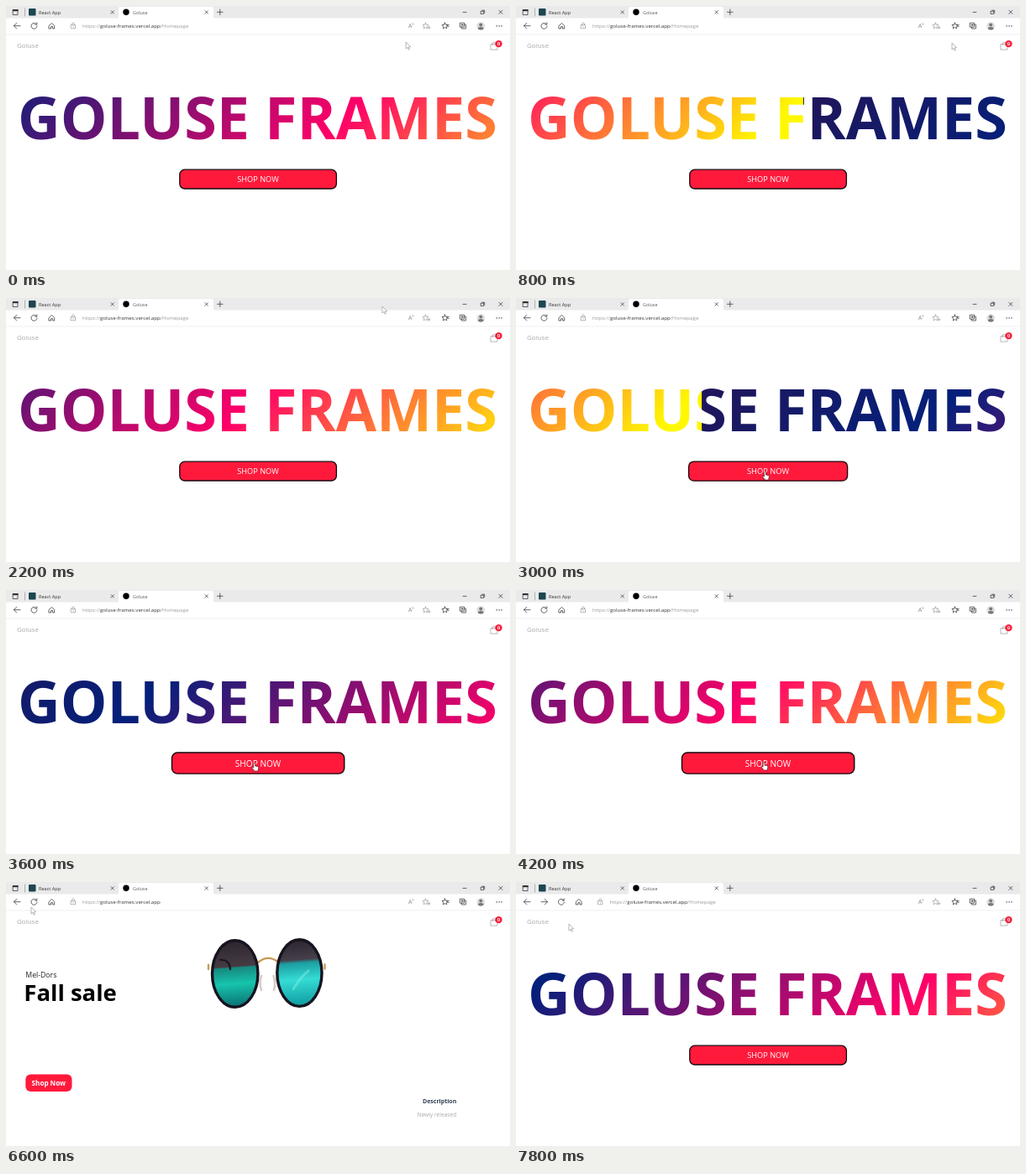
An HTML page that plays this animation: 600x315 px, repeating every 8000 ms.

```html
<!DOCTYPE html>
<html lang="en">
<head>
<meta charset="utf-8">
<title>Goluse</title>
<style>
  html, body { margin: 0; width: 100%; height: 100%; overflow: hidden; background: #fff; }
  #stage { position: absolute; left: 0; top: 0; width: 600px; height: 315px; overflow: hidden; }
  svg { position: absolute; left: 0; top: 0; font-family: "Open Sans", "Noto Sans", sans-serif; }
  #title {
    position: absolute; left: 14px; top: 85px; width: 571.6px; height: 95px;
    font: bold 70px/95px "Open Sans", "Noto Sans", sans-serif; white-space: nowrap;
    color: transparent;
    background-image: linear-gradient(135deg, #231557 0%, #04207a 27%, #ff0068 64%, #fff800 94%);
    background-size: 1143px 100%;
    -webkit-background-clip: text; background-clip: text;
  }
  .line { fill: none; stroke: #333; stroke-width: .75; stroke-linecap: round; stroke-linejoin: round; }
  .soft { stroke: #888; stroke-width: .6; }
  .bold { font-weight: bold; }
</style>
</head>
<body>
<div id="stage">
  <svg width="600" height="315" viewBox="0 0 600 315">
    <defs>
      <linearGradient id="leftLens" x1=".45" y1="0" x2=".5" y2="1">
        <stop offset="0" stop-color="#2c2530"/><stop offset=".39" stop-color="#463b43"/>
        <stop offset=".41" stop-color="#17887f"/><stop offset=".65" stop-color="#16c4ac"/>
        <stop offset="1" stop-color="#0b6f72"/>
      </linearGradient>
      <linearGradient id="rightLens" x1=".45" y1="0" x2=".5" y2="1">
        <stop offset="0" stop-color="#2c2530"/><stop offset=".3" stop-color="#45404a"/>
        <stop offset=".35" stop-color="#1c9da0"/><stop offset=".6" stop-color="#35dcd4"/>
        <stop offset="1" stop-color="#0f9aa0"/>
      </linearGradient>
    </defs>

    <!-- tab strip -->
    <path fill="#eaeaea" d="M0 0H600V14.5H0Z"/>
    <path fill="#fff" d="M133 15Q134 15 134 12V3Q134 1 136 1H245Q247 1 247 3V12Q247 15 249 15Z"/>
    <path class="line" d="M8.5 4.5h5.5v6h-5.5z"/>
    <path fill="#333" d="M8 4h6.5v2.2H8z"/>
    <path class="line soft" d="M22.5 3V12"/>
    <rect x="27" y="3" width="8.5" height="8.5" rx="1" fill="#1d4650"/>
    <circle cx="143" cy="7.2" r="3.7"/>
    <text x="39" y="9.5" font-size="5.6" fill="#333">React App</text>
    <text x="151" y="9.5" font-size="5.4" fill="#555">Goluse</text>
    <path class="line" d="M125 5.7l3.4 3.4m0-3.4l-3.4 3.4M237 5.7l3.4 3.4m0-3.4l-3.4 3.4M251.5 7.3h6.5m-3.2-3.2v6.4"/>
    <path class="line" d="M544 7.4h4M586.8 5.2l4.2 4.2m0-4.2l-4.2 4.2M565.5 6.2h3.2v3.2h-3.2zM566.7 5.2h3v3"/>

    <!-- toolbar -->
    <path class="line" d="M17 23.7H9.5m3.2-3.3l-3.3 3.3l3.3 3.3"/>
    <path id="forward" class="line" d="M30 23.7h7.5m-3.2-3.3l3.3 3.3l-3.3 3.3"/>
    <g id="address">
      <path class="line" d="M36.4 21.8A3.5 3.5 0 1 0 37 24M36.8 19.9v2.2h-2.3"/>
      <path class="line" d="M51.3 23.4l3.2-2.9l3.2 2.9v3.6h-2.2v-2.4h-2v2.4h-2.2z"/>
      <path class="line soft" d="M77.5 22.6h5v4.2h-5zM78.6 22.6v-1.2a1.4 1.4 0 0 1 2.8 0v1.2M80 24.3v.8"/>
      <text x="91" y="26.2" font-size="6.15" fill="#999">https://<tspan fill="#333">goluse-frames.vercel.app</tspan><tspan id="path">/Homepage</tspan></text>
    </g>
    <text x="479" y="26.3" font-size="6.8" fill="#888">A</text>
    <path class="line soft" d="M484.3 20.2q1.2 1.2 0 2.6"/>
    <g id="stars"></g>
    <path class="line soft" d="M502.3 25.8h2.8m-1.4-1.4v2.8"/>
    <path class="line" d="M524.8 22.6h2.4m-1.7 1.8h1.7"/>
    <path class="line" d="M540.7 20.2h4.9v4.9h-4.9zM542.4 25.1v1.9h5v-5h-1.8M543.1 21.5v2.3m-1.1-1.2h2.3"/>
    <circle cx="565.2" cy="24" r="4.8" fill="#dcdcdc"/>
    <circle cx="565.2" cy="22.5" r="1.9" fill="#777"/>
    <path fill="#777" d="M561.8 27.3q0-2.4 3.4-2.4t3.4 2.4q-3.4 2.6-6.8 0"/>
    <path fill="#444" d="M583.5 23.3h1.3v1.3h-1.3zm2.9 0h1.3v1.3h-1.3zm2.9 0h1.3v1.3h-1.3z"/>
    <path stroke="#f0f0f0" d="M0 33.9H600"/>

    <!-- site header -->
    <text x="13" y="50" font-size="8" fill="#aaa">Goluse</text>
    <path class="line soft" d="M577.3 45.6h7.6v6.5h-7.6zM579.2 46.8v-1.6a1.8 1.8 0 0 1 3.6 0v1.6"/>
    <circle cx="586.5" cy="45.1" r="4.2" fill="#f8203c"/>
    <text class="bold" x="586.5" y="47.1" font-size="5.4" fill="#fff" text-anchor="middle">0</text>

    <g id="shop">
      <rect x="206.8" y="195.2" width="186.6" height="22.8" rx="6" fill="#ff1a3c" stroke="#15080c" stroke-width="1.3"/>
      <text x="300" y="210.2" font-size="9.2" font-weight="500" fill="#fff" text-anchor="middle">SHOP NOW</text>
    </g>

    <g id="product">
      <text x="23.3" y="114" font-size="8.7" fill="#222">Mel-Dors</text>
      <text class="bold" x="21.3" y="142.2" font-size="27.5">Fall sale</text>
      <rect x="23.3" y="229.5" width="55.2" height="20.5" rx="6" fill="#ff1a3c"/>
      <text class="bold" x="50.8" y="243" font-size="8.1" fill="#fff" text-anchor="middle">Shop Now</text>
      <text class="bold" x="536.3" y="264.4" font-size="7" fill="#2f3e50" text-anchor="end">Description</text>
      <text x="536.3" y="279.6" font-size="6.65" fill="#aaa" text-anchor="end">Newly released</text>
      <g fill="none" stroke-linecap="round">
        <path stroke="#c99a55" stroke-width="2.4" d="M300 96Q312 86 324 95.5M241 99v5M379.5 98.5v5"/>
        <path stroke="#d8cbc6" stroke-width="2.6" d="M304 112q-3 8 0 17M318.5 112q3 8 .5 17"/>
        <g stroke="#17141f" stroke-width="3.4">
          <ellipse cx="272.7" cy="109.5" rx="27.2" ry="39.8" fill="url(#leftLens)"/>
          <ellipse cx="349.4" cy="108.6" rx="26.6" ry="39.8" fill="url(#rightLens)"/>
        </g>
        <path stroke="#1d1820" stroke-width="2.4" d="M255 93q11-1 12 11"/>
        <path stroke="#7eeee5" stroke-width="3" opacity=".5" d="M342 128q8-14 18-22"/>
      </g>
    </g>
  </svg>

  <div id="title">GOLUSE FRAMES</div>

  <svg width="600" height="315" viewBox="0 0 600 315">
    <g id="cursor" stroke-linejoin="round">
      <path id="arrow" fill="#fff" stroke="#999" stroke-width=".7" d="M0 0V8L1.9 6.3L3.2 9.2L4.4 8.6L3.1 5.8H5.7Z"/>
      <path id="hand" fill="#fff" stroke="#222" stroke-width=".6" d="M-.9 .7Q0-.5 .9 .7V4L4 4.7Q5 5 4.8 6.5L4 10H.2L-2.7 6.4Q-2.6 5-.9 6Z"/>
    </g>
  </svg>
</div>
<script>
const LOOP = 8000, STEP = 200;
const OPEN = 5200, BACK = 7400;      // product page shown, home page shown again
const SPEED = 0.5745, TILE = 1143;   // gradient px per ms, px per repeat

const cursorPath = [
  [0, 476, 43], [800, 519, 44], [1400, 512, 40], [2200, 448, 10], [3000, 296.5, 207],
  [4200, 295, 205], [5800, 295, 205], [6600, 30, 30], [7000, 13, 22], [7200, 13, 22], [7800, 63, 50]
];
const hoverScale = [[2800, 1], [3000, 1.013], [3200, 1.07], [3400, 1.1], [5200, 1.1]];

const el = id => document.getElementById(id);
const show = (id, on) => { el(id).style.display = on ? "" : "none"; };
const ease = k => k * k * (3 - 2 * k);

function sample(track, t, curve = k => k) {
  const next = track.findIndex(p => p[0] > t);
  if (next === 0) return track[0].slice(1);
  if (next < 0) return track[track.length - 1].slice(1);
  const a = track[next - 1], b = track[next];
  const k = curve((t - a[0]) / (b[0] - a[0]));
  return a.slice(1).map((v, i) => v + (b[i + 1] - v) * k);
}

function star(cx, cy, style) {
  const points = Array.from({ length: 10 }, (_, i) => {
    const r = i % 2 ? 1.8 : 3.8, a = i * Math.PI / 5 - Math.PI / 2;
    return (cx + r * Math.cos(a)).toFixed(2) + "," + (cy + r * Math.sin(a)).toFixed(2);
  });
  return `<polygon class="${style}" points="${points.join(" ")}"/>`;
}
el("stars").innerHTML = star(499.5, 23.8, "line soft") + star(522.5, 23.8, "line");

function draw(t) {
  const product = t >= OPEN && t < BACK;
  const returned = t >= BACK;

  show("product", product);
  show("shop", !product);
  show("title", !product);
  show("path", !product);
  show("forward", returned);
  el("address").setAttribute("transform", `translate(${returned ? 20.4 : 0} 0)`);

  const shift = returned ? TILE - SPEED * (t - 7310) : 328 - SPEED * (t - 800);
  el("title").style.backgroundPosition = `${shift % TILE}px 0`;

  const scale = returned ? 1 : sample(hoverScale, t)[0];
  el("shop").setAttribute("transform", `translate(300 206.6) scale(${scale}) translate(-300 -206.6)`);

  const [x, y] = sample(cursorPath, t, ease);
  const overButton = t >= 3000 && t < OPEN;
  el("cursor").setAttribute("transform", `translate(${x} ${y})`);
  show("hand", overButton);
  show("arrow", !overButton);
}

const start = performance.now();
function tick() {
  const t = (performance.now() - start) % LOOP;
  draw(Math.floor(t / STEP) * STEP);
  requestAnimationFrame(tick);
}
tick();
</script>
</body>
</html>
```
